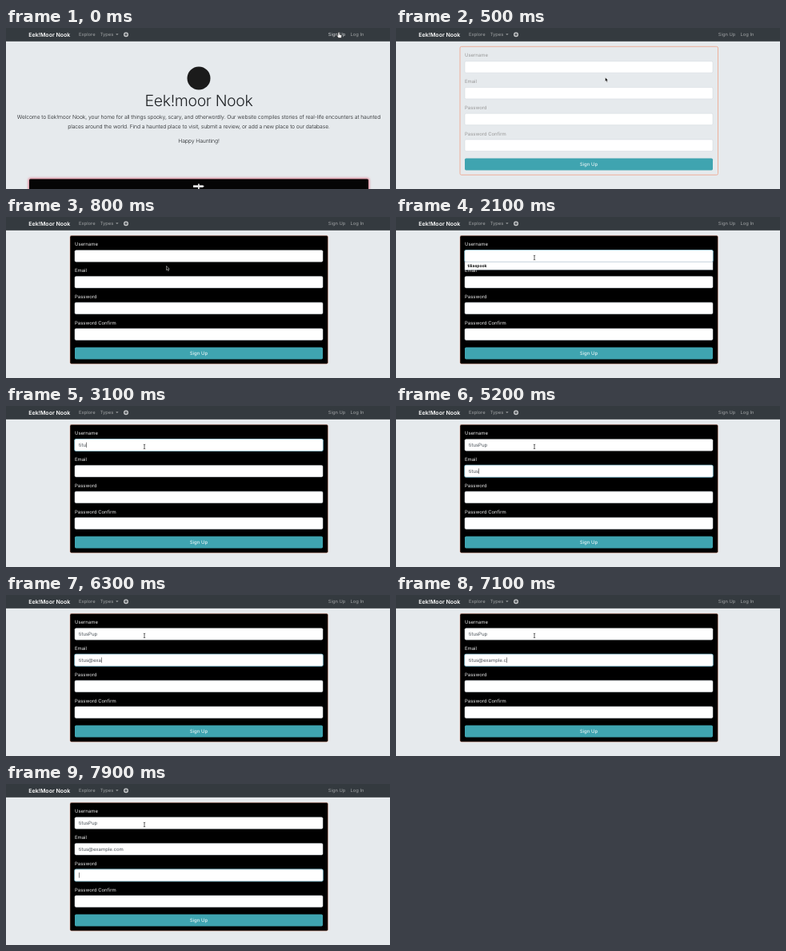
Recreate the animation shown at these times as an HTML page. Size 480x202 px, loop 8 s.

```html
<!DOCTYPE html>
<html lang="en">
<head>
<meta charset="utf-8">
<title>Sign up</title>
<style>
  html, body { margin: 0; width: 100%; height: 100%; overflow: hidden; background: #e6eaed; }
  svg { display: block; width: 480px; height: 202px; font-family: Inter, "Open Sans", sans-serif; text-rendering: geometricPrecision; }
  .nav { font-size: 5.8px; fill: #a0a3a5; }
  .brand { font-size: 7px; font-weight: 600; fill: #fff; }
  .title { font-size: 19.5px; font-weight: 300; letter-spacing: -.35px; fill: #202326; text-anchor: middle; }
  .lead { font-size: 6.8px; font-weight: 300; letter-spacing: -.1px; fill: #1c1f22; text-anchor: middle; }
  .label { font-size: 5.95px; }
  .value { font-size: 6px; fill: #495057; }
  .hint { font-size: 5.05px; font-weight: 700; fill: #111; }
  .button { font-size: 6px; fill: #fff; text-anchor: middle; }
</style>
</head>
<body>
<svg id="stage" viewBox="0 0 480 202">
  <defs><filter id="blur" x="-5%" y="-50%" width="110%" height="200%"><feGaussianBlur stdDeviation="1.8"/></filter></defs>
  <rect width="480" height="202" fill="#e6eaed"/>

  <g id="home">
    <circle cx="241" cy="63" r="14.5" fill="#1b1b1b"/>
    <text class="title" x="241" y="98">Eek!moor Nook</text>
    <text class="lead" x="241" y="114.3">Welcome to Eek!moor Nook, your home for all things spooky, scary, and otherwordly. Our website compiles stories of real-life encounters at haunted</text>
    <text class="lead" x="241" y="126">places around the world. Find a haunted place to visit, submit a review, or add a new place to our database.</text>
    <text class="lead" x="241" y="143.5">Happy Haunting!</text>
    <rect x="28" y="188.5" width="426" height="24" rx="2" fill="#e0778a" filter="url(#blur)"/>
    <rect x="29" y="189.5" width="424" height="24" rx="1.5" fill="#050505"/>
    <path d="M234 197.2h12l1.8 1.4-1.8 1.5h-12zM240 195.5h1.8V202H240z" fill="#e4e4e4"/>
  </g>

  <g id="form">
    <rect id="card" x="80" y="23.3" width="322.5" height="161" rx="1.8" stroke="#eeaa94" stroke-width=".9"/>
    <g id="fields"></g>
    <rect x="86" y="163.6" width="310" height="14.8" rx="1.6" fill="#3fa4b0"/>
    <text class="button" x="241" y="173.2">Sign Up</text>
    <g id="menu">
      <rect x="86" y="56.2" width="310" height="10" fill="#fff" stroke="#aebccb" stroke-width=".5"/>
      <text class="hint" x="89.5" y="63.1">tiliaspook</text>
    </g>
    <rect id="caret" width=".6" height="6.6" fill="#333"/>
  </g>

  <rect width="480" height="16.8" fill="#343a3f"/>
  <text class="brand" x="28.3" y="10.5">Eek!Moor Nook</text>
  <g class="nav">
    <text x="91" y="10.2">Explore</text>
    <text x="117.7" y="10.2">Types</text>
    <path d="M137.2 7.3h3.4l-1.7 1.8z"/>
    <circle cx="150" cy="8.2" r="3" fill="#c3c5c7"/>
    <path d="M148.2 8.2h3.6M150 6.4V10" stroke="#343a3f" stroke-width=".9"/>
    <text id="signup" x="402.8" y="10.2">Sign Up</text>
    <text x="430.6" y="10.2">Log In</text>
  </g>

  <g id="cursor">
    <path id="hand" d="M0 0c.9-.4 1.3.2 1.3 1v1.6l2.2.6c.6.2.8.7.7 1.3L3.7 7H.2L-1.9 4.3c-.3-.7.4-1 1-.6l.4.4V.8c0-.4.2-.7.5-.8z" fill="#fff" stroke="#111" stroke-width=".5"/>
    <path id="arrow" d="M0 0v5.2l1.2-1.1.9 2 .9-.4-.9-1.9h1.6z" fill="#000" stroke="#fff" stroke-width=".45"/>
    <path id="beam" d="M-1.2-2.8Q0-2.8 0-2 0-2.8 1.2-2.8M0-2V2M-1.2 2.8Q0 2.8 0 2 0 2.8 1.2 2.8" fill="none" stroke="#222" stroke-width=".7"/>
  </g>
</svg>
<script>
const LOOP = 8000, STEP = 100;
const $ = id => document.getElementById(id);
const show = (el, on) => el.setAttribute('visibility', on ? 'visible' : 'hidden');

function add(tag, attrs, text = '') {
  const el = document.createElementNS('http://www.w3.org/2000/svg', tag);
  for (const k in attrs) el.setAttribute(k, attrs[k]);
  el.textContent = text;
  return $('fields').appendChild(el);
}

// Focus time and the time of each key stroke
const inputs = [
  { label: 'Username', text: 'titusPup', focus: 1500,
    keys: [2600, 2800, 2900, 3100, 3200, 3400, 3600, 3700] },
  { label: 'Email', text: 'titus@example.com', focus: 4000,
    keys: [4500, 4600, 4700, 4800, 4900, 5300, 5700, 6000, 6200, 6400, 6500, 6600, 6800, 6900, 7100, 7200, 7300] },
  { label: 'Password', text: '', focus: 7600, keys: [] },
  { label: 'Password Confirm', text: '', focus: LOOP, keys: [] }
];
inputs.forEach((f, i) => {
  f.y = 41.7 + i * 32.75;
  f.title = add('text', { class: 'label', x: 86, y: f.y - 5.4 }, f.label);
  f.glow = add('rect', { x: 85.3, y: f.y - .7, width: 311.4, height: 15.9, rx: 2.2, fill: '#62aec4' });
  add('rect', { x: 86, y: f.y, width: 310, height: 14.5, rx: 1.6, fill: '#fff', stroke: '#ced4da', 'stroke-width': .5 });
  f.value = add('text', { class: 'value', x: 91, y: f.y + 9.4 });
});

const path = [[0, 415.5, 5.5], [200, 415.5, 5.5], [500, 261.5, 62], [800, 200.5, 61.5], [1300, 173, 51], [LOOP, 173, 51]];
const mix = (a, b, k) => a + (b - a) * k;
const smooth = k => k * k * (3 - 2 * k);

function pointer(t) {
  const i = path.findIndex((p, n) => n && t < p[0]);
  const [t0, x0, y0] = path[i - 1], [t1, x1, y1] = path[i];
  const k = smooth((t - t0) / (t1 - t0));
  return [mix(x0, x1, k), mix(y0, y1, k)];
}

function draw(t) {
  const home = t < 200;
  show($('home'), home);
  show($('form'), !home);
  $('signup').setAttribute('fill', home ? '#d5d7d8' : '#a0a3a5');

  const k = smooth(Math.min(1, Math.max(0, (t - 500) / 300)));
  const grey = Math.round(mix(152, 235, k));
  $('card').setAttribute('fill', `rgba(0,0,0,${k})`);
  $('card').setAttribute('stroke-opacity', mix(1, .55, k));

  const active = inputs.filter(f => t >= f.focus).pop();
  for (const f of inputs) {
    f.title.setAttribute('fill', `rgb(${grey},${grey},${grey})`);
    f.value.textContent = f.text.slice(0, f.keys.filter(s => s <= t).length);
    show(f.glow, f === active && !home);
  }
  show($('menu'), t >= 1900 && t < 2600);

  // The caret stays lit for half a second after each key
  let lit = false;
  if (active) {
    const last = Math.max(active.focus, ...active.keys.filter(s => s <= t));
    lit = Math.floor((t - last) / 500) % 2 === 0;
    const w = active.value.textContent ? active.value.getComputedTextLength() : 0;
    $('caret').setAttribute('x', 91.2 + w);
    $('caret').setAttribute('y', active.y + 3.9);
  }
  show($('caret'), lit);

  const [x, y] = pointer(t);
  const overInput = !home && y > 41.7 && y < 56.2 && x > 86 && x < 396;
  $('cursor').setAttribute('transform', `translate(${x} ${y})`);
  show($('hand'), home);
  show($('beam'), overInput);
  show($('arrow'), !home && !overInput);
}

function tick() {
  draw(Math.floor(performance.now() % LOOP / STEP) * STEP);
  requestAnimationFrame(tick);
}
tick();
</script>
</body>
</html>
```
